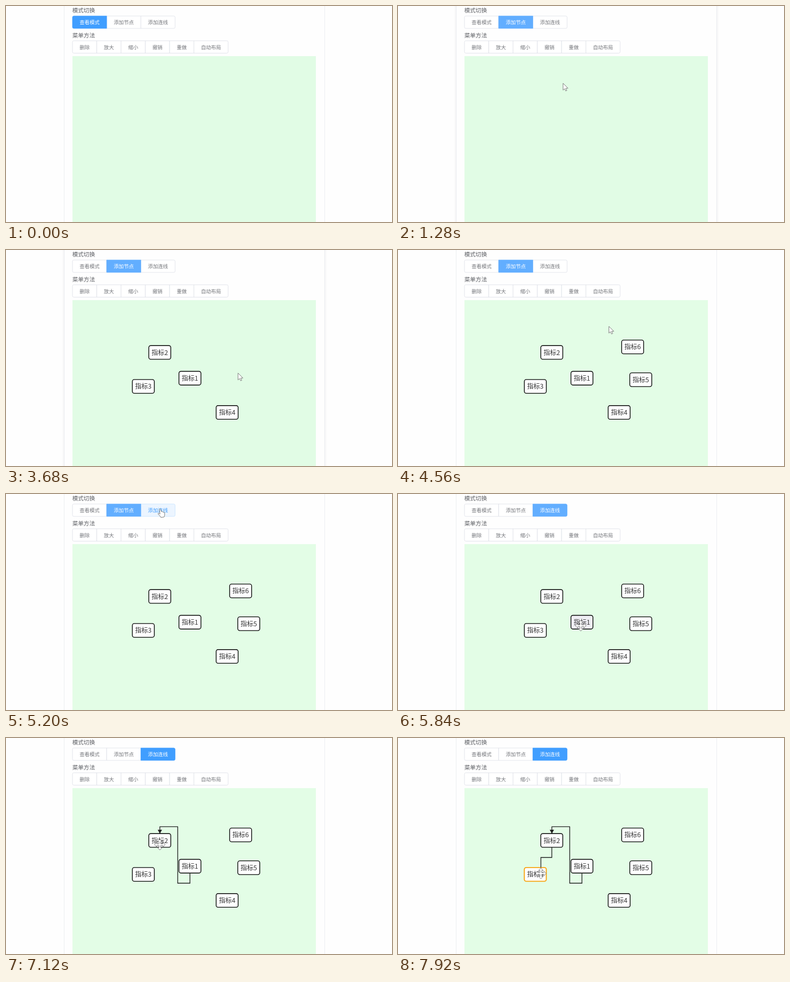
Recreate the animation shown at these times as an HTML page. Size 720 by 405 pixels, loop 8000 ms.

```html
<!DOCTYPE html>
<html lang="zh-CN">
<head>
<meta charset="utf-8">
<title>流程图编辑</title>
<style>
html, body { margin: 0; width: 100%; height: 100%; overflow: hidden; background: #fefefe; }
svg { display: block; width: 720px; height: 405px; font-family: "Noto Sans CJK SC", "Noto Sans", sans-serif; font-weight: 300; }
.title { font-size: 10.6px; fill: #5c5e63; }
.btn { font-size: 9.35px; text-anchor: middle; fill: #74767b; }
.btn path { fill: #fff; stroke: #dcdfe6; stroke-width: .8; }
.btn.hover { fill: #409eff; }
.btn.hover path { fill: #ecf5ff; stroke: #c6e2ff; }
.btn.active { fill: #fff; }
.btn.active path { fill: #409eff; stroke: #409eff; }
.btn.active.focus path { fill: #62aeff; stroke: #62aeff; }
.node { font-size: 12px; text-anchor: middle; fill: #333; }
.node rect { fill: #fefeff; stroke: #000; stroke-width: 1.35; }
.node.hover rect { fill: #efeef4; }
.node.target rect { stroke: #f7a411; stroke-width: 1.9; }
.edge { fill: none; stroke: #222; stroke-width: 1.35; }
.card { stroke: #ebedf1; }
#shadow { stroke: #000; stroke-opacity: .025; stroke-width: 4; }
#cursor path { fill: #fff; stroke: #707070; stroke-width: .9; stroke-linejoin: round; }
</style>
</head>
<body>
<svg viewBox="0 0 720 405">
  <path id="shadow" d="M107.5 0V405M595.5 0V405"/>
  <path class="card" d="M108.5 0V405M594.5 0V405"/>
  <g id="toolbar"></g>
  <rect id="board" x="124" y="94" width="454" height="311"/>
  <g id="nodes"></g>
  <path class="edge" id="edge1"/>
  <path id="head" d="M287 179.5l-4-7.5h8z" fill="#222"/>
  <path class="edge" id="edge2"/>
  <g id="cursor">
    <path id="arrow" d="M.4 .4V13.2L3.3 10.5L5.3 14.8L7.4 13.8L5.4 9.7H9.6Z"/>
    <path id="hand" d="M-1 1Q0-1.5 1.5 1L2.5 5Q4 4 4.8 5.5Q6 5 7 6.4Q9 6 9 9Q9 13 8 15L2 16Q0 12-3 10Q-4 8-2 8L.3 9.5Z"/>
    <path id="move"/>
  </g>
</svg>
<script>
const LOOP = 8000, STEP = 80, LEFT = 124;
const W = 41, H = 25.7, BTN_H = 23.2, R = 2.5;
const LINK1 = 6080, LINKED = 6960, LINK2 = 7360;
const $ = id => document.getElementById(id);
const show = (el, on) => { el.style.display = on ? '' : 'none'; };
const inside = (px, py, { x, y, w, h }) => px > x && px < x + w && py > y && py < y + h;

function add(parent, tag, attrs, text) {
  const el = document.createElementNS('http://www.w3.org/2000/svg', tag);
  for (const k in attrs) el.setAttribute(k, attrs[k]);
  if (text) el.textContent = text;
  return parent.appendChild(el);
}

// Button groups; widths follow the label lengths
const groups = { 模式切换: '查看模式 添加节点 添加连线', 菜单方法: '删除 放大 缩小 撤销 重做 自动布局' };
const buttons = Object.entries(groups).flatMap(([title, labels], row) => {
  const y = 18.8 + 46.4 * row;
  let right = LEFT;
  add($('toolbar'), 'text', { class: 'title', x: LEFT - .3, y: y - 6.5 }, title);
  return labels.split(' ').map((label, i, all) => {
    const w = 9.25 * label.length + 26.8, x = right;
    const l = i ? 0 : R, r = i < all.length - 1 ? 0 : R;
    const el = add($('toolbar'), 'g');
    right += w;
    add(el, 'path', { d: `M${x + l} ${y}H${right - r}q${r} 0 ${r} ${r}v${BTN_H - 2 * r}q0 ${r} ${-r} ${r}H${x + l}q${-l} 0 ${-l} ${-l}V${y + l}q0 ${-l} ${l} ${-l}Z` });
    add(el, 'text', { x: x + w / 2, y: y + 15.4 }, label);
    return { el, x, y, w, h: BTN_H };
  });
});

// Nodes are dropped at a steady pace, top left corner at the pointer
const nodes = [[322.6, 227.5], [266.4, 179.2], [235.6, 242.9], [392, 291.7], [432.4, 230.4], [417.2, 168.9]].map(([x, y], i) => {
  const el = add($('nodes'), 'g');
  add(el, 'rect', { x, y, width: W, height: H, rx: 3.6 });
  add(el, 'text', { x: x + W / 2, y: y + 17.3 }, '指标' + (i + 1));
  return { el, x, y, w: W, h: H, born: 1812 + 507 * i };
});

// Four-way cursor: one arm turned in quarter steps
const arm = [[-1.6, -1.6], [-1.6, -5.6], [-4.4, -5.6], [0, -10], [4.4, -5.6], [1.6, -5.6]];
const quarter = ([x, y]) => [-y, x];
let outline = [], turned = arm;
for (let i = 0; i < 4; i++, turned = turned.map(quarter)) outline.push(...turned);
$('move').setAttribute('d', `M${outline.join('L')}Z`);

// Pointer stops: x, y, arrival, departure
const stops = [
  [262, -16, 0, 80], [278, 74, 400, 400], [222, 30, 720, 960], [307.5, 144.5, 1280, 1360],
  ...nodes.map(n => [n.x, n.y, n.born - 160, n.born]),
  [287, 28, 5120, 5440], [341, 247, 5840, LINK1], [287, 200, 6800, LINK2], [266.5, 254, 7840, LOOP]
];
function pointer(t) {
  const i = stops.findLastIndex(s => s[2] <= t);
  const [x, y, , leave] = stops[i];
  if (t <= leave) return [x, y];
  const [nx, ny, arrive] = stops[i + 1];
  const u = (t - leave) / (arrive - leave), e = u * u * (3 - 2 * u);
  return [x + (nx - x) * e, y + (ny - y) * e];
}

// Orthogonal connector leaving the bottom of a node
function route(node, x, y) {
  const sx = node.x + W / 2, sy = node.y + H;
  if (y > sy + 10) return `M${sx} ${sy}V${(sy + y) / 2}H${x}V${y}`;
  return `M${sx} ${sy}v19H${(sx + x) / 2 + 5.3}V${y - 12.7}H${x}V${y}`;
}

function draw(t) {
  const [x, y] = pointer(t);
  const mode = t < 880 ? 0 : t < 5360 ? 1 : 2;
  const focus = t >= 880 && t < LINK1;
  const linked = t >= LINKED;
  const linking = (t >= LINK1 && !linked) || t >= LINK2;
  const source = nodes[linked ? 1 : 0];

  const button = buttons.find(b => inside(x, y, b));
  for (const b of buttons) b.el.setAttribute('class', b === button ? 'btn hover' : 'btn');
  const active = buttons[mode].el;
  active.setAttribute('class', focus ? 'btn active focus' : 'btn active');
  $('toolbar').append(active);

  const node = nodes.find(n => t >= n.born && inside(x, y, n));
  for (const n of nodes) {
    const state = n !== node ? '' : linking && n !== source ? ' target' : t < LINK1 ? ' hover' : '';
    n.el.setAttribute('class', 'node' + state);
    show(n.el, t >= n.born);
  }

  show($('edge1'), t > LINK1);
  show($('head'), linked);
  show($('edge2'), t > LINK2);
  $('edge1').setAttribute('d', linked ? route(nodes[0], 287, 179) : route(nodes[0], x, y - 11));
  $('edge2').setAttribute('d', route(nodes[1], x, y - 11));

  $('board').setAttribute('fill', t < 3840 ? '#e1fce5' : '#e3fde6');
  show($('shadow'), t >= 240 && t < 3840);
  show($('cursor'), t >= 160);
  $('cursor').setAttribute('transform', `translate(${x} ${y})`);
  show($('hand'), button);
  show($('move'), node);
  show($('arrow'), !button && !node);
}

function tick() {
  draw(Math.floor(performance.now() % LOOP / STEP) * STEP);
  requestAnimationFrame(tick);
}
tick();
</script>
</body>
</html>
```
